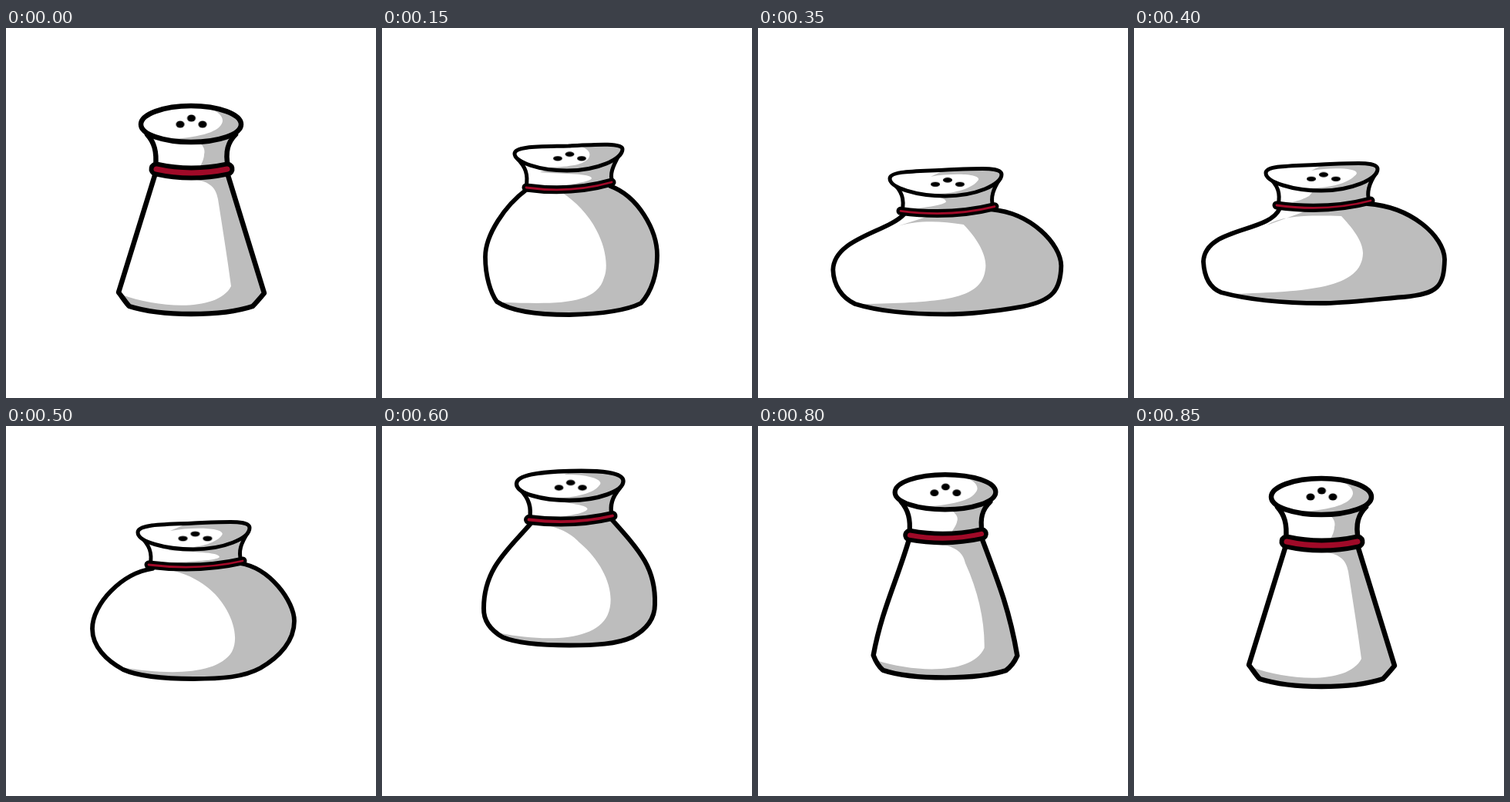
Animation, 480 px wide and 480 px high, one loop 0.9 s. Source, as an HTML page without scripts:

```html
<!DOCTYPE html>
<html lang="en">
<head>
<meta charset="utf-8">
<title>Bouncing salt shaker</title>
<style>
  html, body { margin: 0; width: 100%; height: 100%; overflow: hidden; background: #fff; }
  svg { display: block; width: 100%; height: 100%; }

  path {
    --thick: 6.5px; --thin: 5px;
    fill: #fff;
    animation: pose 900ms infinite;
  }
  .line { fill: none; stroke: #000; stroke-linejoin: round; stroke-linecap: round; }
  .shade { fill: #bdbdbd; }
  .edge { --thick: 19px; --thin: 11px; }
  .ribbon { --thick: 7px; --thin: 2.8px; stroke: #a00a28; }
  .hop { animation: hop 900ms steps(1) infinite; }
  .holes { animation: holes 900ms infinite; }

  /* Each part supplies its outline for every pose. */
  .body {
    --thin: 5.8px;
    --rest: path("M194,188 C178,240 162,292 146,343 C151,349 155,356 160,361 C185,369 212,371 240,371 C268,371 296,369 320,361 C325,356 330,350 335,344 C319,292 303,240 287,188");
    --dip: path("M187,210 C160,230 134,268 134,297 C134,322 141,344 149,355 C168,368 205,372 243,372 C285,371 318,366 336,357 C350,342 357,318 357,295 C357,262 332,218 296,205");
    --wide: path("M190,229 C150,235 112,275 112,307 C112,330 130,348 152,360 C175,370 210,372 243,372 C280,372 308,370 330,358 C356,343 374,322 374,297 C374,272 343,228 303,222");
    --flat: path("M189,248 C176,280 92,272 90,317 C91,336 98,351 113,357 C150,367 195,371 243,371 C275,371 310,366 350,363 C395,359 402,349 403,314 C402,284 360,246 303,242");
    --stretch: path("M191,197 C175,256 148,266 148,338 C147,350 150,355 157,360 C177,368 209,369 240,369 C269,369 297,368 315,362 C326,357 330,349 330,338 C333,271 325,271 287,190");
  }
  .body-shade {
    --rest: path("M240,196 C262,198 272,205 275,222 C281,260 287,298 292,335 C275,368 200,364 150,346 L140,390 L420,390 L420,180 Z");
    --dip: path("M234,214 C250,224 268,242 278,262 C290,284 294,310 288,324 C278,360 225,358 157,356 L140,390 L420,390 L420,180 Z");
    --wide: path("M200,231 C228,236 250,234 262,249 C290,276 302,310 290,332 C275,365 220,353 155,357 L140,390 L420,390 L420,180 Z");
    --flat: path("M172,270 C192,257 225,257 269,258 C282,272 297,290 297,306 C296,352 225,356 128,359 L140,390 L420,390 L420,180 Z");
    --rise: path("M208,230 C232,234 248,243 261,253 C286,272 306,312 293,337 C275,366 215,368 150,357 L140,390 L420,390 L420,180 Z");
    --stretch: path("M217,200 C238,206 245,215 248,222 C286,256 300,296 288,326 C276,362 212,366 150,352 L140,390 L420,390 L420,180 Z");
  }
  .neck {
    --rest: path("M183,138 C192,148 196,160 194,180 Q240,192 288,180 C284,160 288,148 298,138");
    --dip: path("M176,170 C186,180 190,190 187,206 Q245,215 299,200 C295,190 299,180 308,164");
    --wide: path("M173,186 C187,198 190,210 187,224 Q250,232 305,219 C301,206 305,196 314,182");
    --flat: path("M173,206 C188,218 190,230 187,244 Q250,253 305,238 C301,226 306,214 314,202");
    --stretch: path("M182,151 C191,163 194,174 192,190 Q242,197 287,185 C286,171 288,161 299,151");
  }
  .neck-shade {
    --rest: path("M246,146 C255,150 259,157 257,164 C257,170 254,175 251,182 L330,250 L330,140 Z");
    --dip: path("M205,187 C235,190 271,188 272,195 C270,200 245,202 225,207 L330,250 L330,140 Z");
    --wide: path("M210,205 C240,208 276,207 277,214 C272,219 245,219 210,222 L330,260 L330,140 Z");
    --flat: path("M234,222 C232,226 230,229 227,232 C222,235 214,238 205,240 L330,280 L330,140 Z");
    --stretch: path("M238,160 C249,167 254,170 252,174 C249,180 243,184 238,188 L330,250 L330,140 Z");
  }
  .band {
    --rest: path("M195,183 Q240,193 287,183");
    --dip: path("M187,207 Q245,215 298,200");
    --wide: path("M185,224 Q250,232 307,219");
    --flat: path("M185,244 Q250,253 307,238");
    --stretch: path("M192,191 Q242,197 287,186");
  }
  .rim {
    --rest: path("M175,125 C175,112 204,101 240,101 C276,101 305,112 305,125 C305,138 276,148 240,148 C204,148 175,138 175,125 Z");
    --dip: path("M172,163 C172,153 205,154 242,153 C280,151 312,149 312,157 C312,170 280,185 240,185 C204,185 172,174 172,163 Z");
    --wide: path("M171,182 C171,171 206,172 244,170 C290,168 316,166 316,176 C316,190 282,204 243,204 C206,204 171,194 171,182 Z");
    --flat: path("M171,202 C171,192 206,193 244,191 C290,189 316,187 316,197 C316,210 282,225 243,225 C206,225 171,214 171,202 Z");
    --stretch: path("M174,140 C174,127 204,119 239,119 C276,119 306,126 306,139 C306,151 275,161 239,161 C204,161 174,153 174,140 Z");
  }
  .rim-shade {
    --rest: path("M258,101 C276,108 284,116 280,124 C274,136 250,142 205,145 L330,230 L330,90 Z");
    --dip: path("M250,152 C268,155 272,162 268,169 C262,177 246,180 215,181 L330,230 L330,130 Z");
    --wide: path("M213,180 C245,174 290,176 279,187 C272,195 255,201 232,202 L330,230 L330,130 Z");
    --flat: path("M230,199 C260,194 300,196 286,206 C278,214 262,220 232,222 L330,240 L330,150 Z");
    --stretch: path("M255,118 C278,122 288,134 280,140 C272,151 250,156 205,158 L330,230 L330,100 Z");
  }

  /* Moves on a 50 ms beat. */
  @keyframes pose {
    0%, 94.44%, 100% { d: var(--rest); stroke-width: var(--thick); animation-timing-function: steps(3); }
    16.66% { d: var(--dip); stroke-width: var(--thin); animation-timing-function: steps(2); }
    27.77% { d: var(--wide); stroke-width: var(--thin); animation-timing-function: steps(3); }
    44.44% { d: var(--flat); stroke-width: var(--thin); animation-timing-function: steps(2); }
    55.55% { d: var(--rise, var(--wide)); stroke-width: var(--thin); animation-timing-function: steps(4); }
    77.77% { d: var(--stretch); stroke-width: calc((var(--thick) + var(--thin)) / 2); animation-timing-function: steps(3); }
  }
  @keyframes holes {
    0%, 94.44%, 100% { transform: translate(240.5px, 121px) scale(1, 1); animation-timing-function: steps(3); }
    16.66% { transform: translate(243.5px, 166.5px) scale(1.07, .7); animation-timing-function: steps(2); }
    27.77% { transform: translate(246px, 186px) scale(1.1, .7); animation-timing-function: steps(3); }
    44.44% { transform: translate(246px, 207px) scale(1.1, .7); animation-timing-function: steps(2); }
    55.55% { transform: translate(245.5px, 187px) scale(1.1, .75); animation-timing-function: steps(4); }
    77.77% { transform: translate(240px, 138.5px) scale(1, .9); animation-timing-function: steps(3); }
  }
  @keyframes hop {
    0%, 38.88%, 100% { transform: translate(0, 0); }
    44.44% { transform: translate(0, -14px); animation-timing-function: steps(2); }
    55.55% { transform: translate(0, -44px); }
    61.11% { transform: translate(1px, -52px); }
    66.66% { transform: translate(2px, -86px); }
    72.22% { transform: translate(3px, -105px); }
    77.77% { transform: translate(3px, -66px); animation-timing-function: steps(3); }
    94.44% { transform: translate(3px, -33px); }
  }
</style>
</head>
<body>
<svg viewBox="0 0 480 480">
  <clipPath id="in-body"><path class="body"/></clipPath>
  <clipPath id="in-neck"><path class="neck"/></clipPath>
  <clipPath id="in-rim"><path class="rim"/></clipPath>

  <g class="hop">
    <path class="body"/>
    <path class="shade body-shade" clip-path="url(#in-body)"/>
    <path class="line body"/>

    <path class="neck"/>
    <path class="shade neck-shade" clip-path="url(#in-neck)"/>
    <path class="line neck"/>

    <path class="line band edge"/>
    <path class="line band ribbon"/>

    <path class="rim"/>
    <path class="shade rim-shade" clip-path="url(#in-rim)"/>
    <path class="line rim"/>

    <g class="holes">
      <ellipse cx="-14.5" cy="4" rx="5.5" ry="4.5"/>
      <ellipse cy="-4" rx="5.5" ry="4.5"/>
      <ellipse cx="14.5" cy="4" rx="5.5" ry="4.5"/>
    </g>
  </g>
</svg>
</body>
</html>
```
